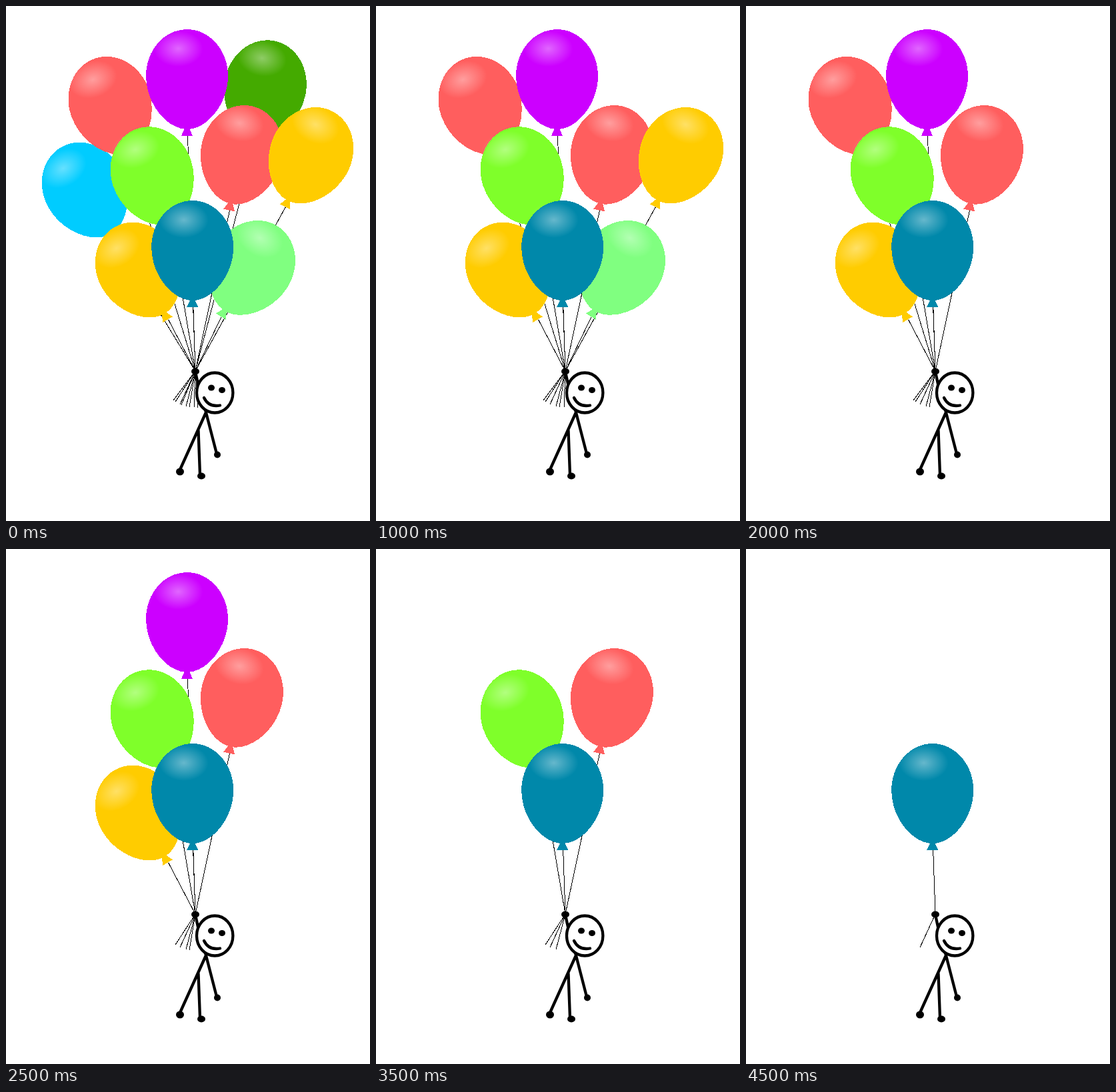
Write an HTML page that moves like this. It is 546x773 px and loops after 5000 ms.

```html
<!DOCTYPE html>
<html lang="en">
<head>
<meta charset="utf-8">
<title>Balloons</title>
<style>
  html, body { margin: 0; width: 100%; height: 100%; overflow: hidden; background: #fff; }
  svg { display: block; width: 100%; height: 100%; }
  #strings { stroke: #000; fill: none; }
  #strings, #balloons { shape-rendering: crispEdges; }
</style>
</head>
<body>
<svg viewBox="0 0 546 773">
  <defs>
    <radialGradient id="shine">
      <stop offset="0" stop-color="#fff" stop-opacity=".4"/>
      <stop offset="1" stop-color="#fff" stop-opacity="0"/>
    </radialGradient>
    <g id="balloon">
      <path d="M0 72L8.7 90H-8.7Z"/>
      <path d="M-61.5 0A61.5 70 0 0 1 61.5 0C61.5 42 30 80 0 80S-61.5 42 -61.5 0Z"/>
      <ellipse cx="-13" cy="-41" rx="37" ry="27" fill="url(#shine)"/>
    </g>
  </defs>
  <g id="strings"></g>
  <g id="balloons"></g>
  <g fill="none" stroke="#000" stroke-width="4.3" stroke-linecap="round">
    <path d="M284 549L289 572L300 610L316 672M299.5 611L260.5 697M288.5 637L291 704"/>
    <ellipse cx="313.2" cy="580.5" rx="27.2" ry="30" fill="#fff"/>
    <path d="M297 588Q304 602.5 321 599.5"/>
    <g fill="#000" stroke="none">
      <ellipse cx="284" cy="548.5" rx="6" ry="5"/>
      <ellipse cx="308" cy="573" rx="5" ry="4.5"/>
      <ellipse cx="324" cy="576.5" rx="5" ry="4.5"/>
      <circle cx="317" cy="673.5" r="5"/>
      <ellipse cx="261" cy="699" rx="6" ry="5.5"/>
      <ellipse cx="293" cy="705.5" rx="6" ry="5"/>
    </g>
  </g>
</svg>
<script>
const STEP = 500, LOOP = 5000;
const HAND = { x: 284, y: 548 };
const KNOT = 90, TAIL = 55;

// Back to front; tail is how far the loose string end hangs beside the hand.
const balloons = [
  { fill: '#00ccff', x: 117.5, y: 272.7, tilt: -30, tail: 4, leaves: 1 },
  { fill: '#ff5e5e', x: 156, y: 145, tilt: -19, tail: -33, leaves: 5 },
  { fill: '#44aa00', x: 389, y: 121, tilt: 11, tail: -21, leaves: 2 },
  { fill: '#cc00ff', x: 271.5, y: 105, tilt: 0, tail: -9, leaves: 6 },
  { fill: '#7fff2a', x: 219, y: 250.5, tilt: -18, tail: -30, leaves: 9 },
  { fill: '#ff5e5e', x: 354, y: 218.7, tilt: 12.5, tail: -14, leaves: 8 },
  { fill: '#ffcc00', x: 458, y: 220.5, tilt: 26, tail: -30, leaves: 3 },
  { fill: '#ffcc00', x: 197.5, y: 392.7, tilt: -30, tail: -9, leaves: 7 },
  { fill: '#80ff80', x: 370, y: 389.7, tilt: 32, tail: -2, leaves: 4 },
  { fill: '#0088aa', x: 279.7, y: 362, tilt: 0, tail: -23, leaves: 10 }
];

function add(parentId, tag, attributes) {
  const node = document.createElementNS('http://www.w3.org/2000/svg', tag);
  for (const name in attributes) node.setAttribute(name, attributes[name]);
  return document.getElementById(parentId).appendChild(node);
}

// The string runs from the knot through the hand; every loose end has the same length.
function stringPath({ x, y, tilt, tail }) {
  const angle = tilt * Math.PI / 180;
  const knot = [x + 1 - KNOT * Math.sin(angle), y + KNOT * Math.cos(angle)];
  const drop = Math.sqrt(TAIL ** 2 - tail ** 2);
  return `M${knot}L${HAND.x} ${HAND.y}l${tail} ${drop}`;
}

for (const balloon of balloons) {
  const { fill, x, y, tilt } = balloon;
  balloon.nodes = [
    add('strings', 'path', { d: stringPath(balloon) }),
    add('balloons', 'use', { href: '#balloon', fill, transform: `translate(${x} ${y}) rotate(${tilt})` })
  ];
}

function draw() {
  const time = performance.now() % LOOP;
  for (const { leaves, nodes } of balloons) {
    for (const node of nodes) node.style.display = time < leaves * STEP ? '' : 'none';
  }
  requestAnimationFrame(draw);
}
draw();
</script>
</body>
</html>
```
